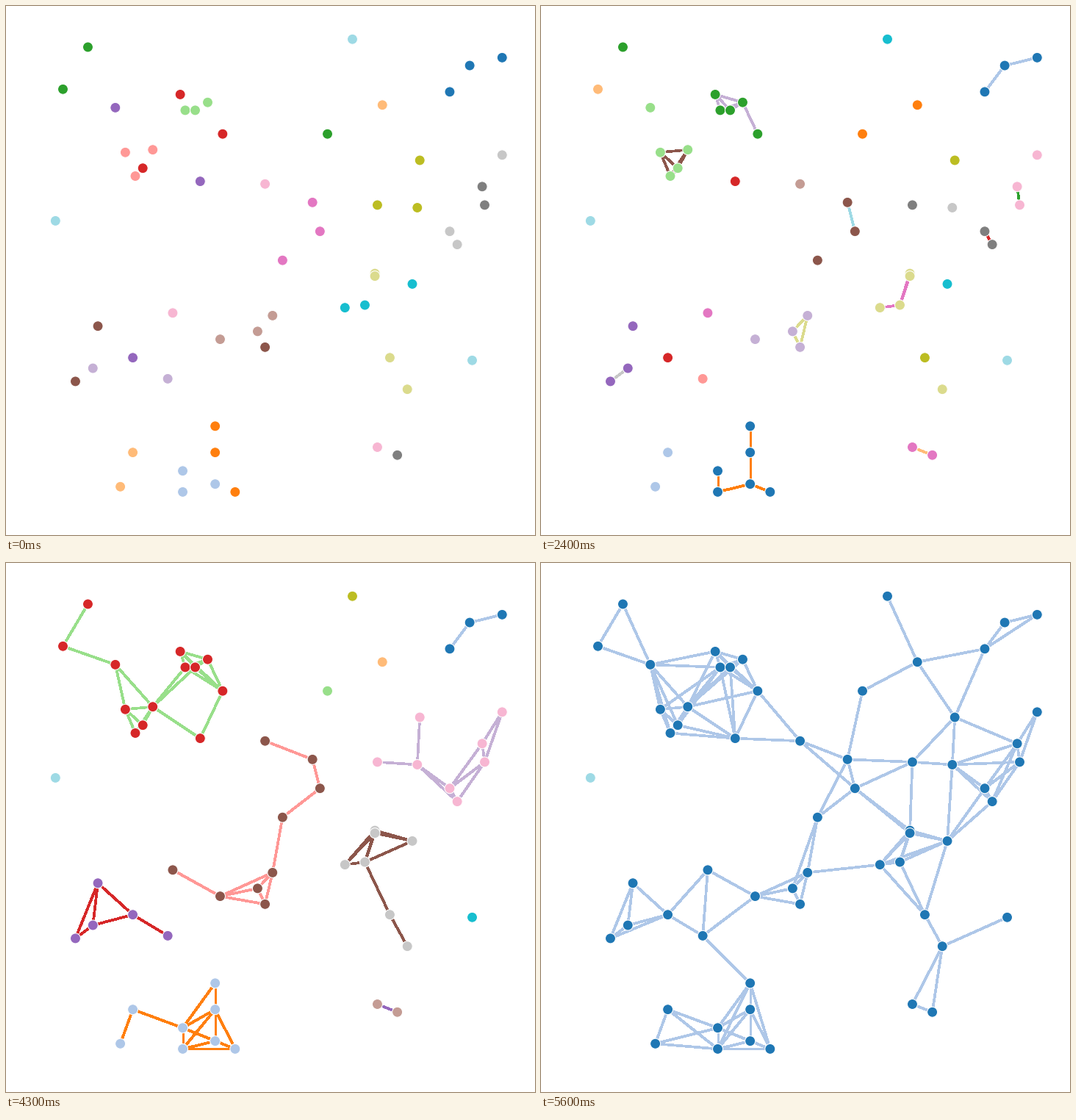
A matplotlib script for the animation above (5.7 s loop, 720x720 px).

```python
import numpy as np
import matplotlib.pyplot as plt
from matplotlib.animation import FuncAnimation
from matplotlib.collections import LineCollection

SIZE, DPI = 720, 96
FRAMES, INTERVAL = 57, 100
START, STEP = 1.5, 0.5
CMAP = plt.get_cmap("tab20")

# The scattered sites; links, groups and colours all follow from them
SITES = np.array([
    (158, 20), (166, 10), (179, 7), (51, 172), (51, 164), (64, 169),
    (64, 147), (64, 157), (72, 172), (31, 157), (26, 170), (131, 25),
    (109, 36), (3, 19), (13, 3), (52, 27), (56, 27), (61, 24),
    (50, 21), (67, 36), (35, 49), (28, 43), (39, 42), (32, 52),
    (24, 26), (58, 54), (31, 121), (45, 129), (15, 125), (8, 130),
    (17, 109), (84, 117), (87, 105), (81, 111), (66, 114), (103, 62),
    (106, 73), (91, 84), (84, 55), (47, 104), (129, 155), (137, 158),
    (171, 56), (172, 63), (179, 44), (158, 73), (161, 78), (129, 63),
    (145, 64), (146, 46), (134, 121), (141, 133), (128, 89), (128, 90),
    (116, 102), (124, 101), (143, 93), (119, 0), (167, 122), (0, 69),
])
xy = np.array([67.3, 45.2]) + SITES * np.array([3.3966, 3.5826])
dist2 = ((SITES[:, None] - SITES[None]) ** 2).sum(axis=2)


def components(near):
    """Label connected groups in order of their first site."""
    label = np.arange(len(near))
    while True:
        lowest = np.where(near, label, len(near)).min(axis=1)
        if (lowest == label).all():
            return np.unique(label, return_inverse=True)[1]
        label = lowest


fig = plt.figure(figsize=(SIZE / DPI, SIZE / DPI), dpi=DPI, facecolor="white")
ax = fig.add_axes([0, 0, 1, 1])
ax.set(xlim=(0, SIZE), ylim=(SIZE, 0))
ax.axis("off")

# Hard-edged links under smooth dots with a white rim
links = LineCollection([], linewidths=2, antialiaseds=False, zorder=1)
ax.add_collection(links, autolim=False)
dots = ax.scatter(*xy.T, s=110, c="white", edgecolors="white",
                  linewidths=0.8, zorder=2)


def update(frame):
    near = dist2 <= (START + STEP * frame) ** 2
    label = components(near)
    a, b = np.nonzero(np.triu(near, 1))
    links.set_segments(np.stack([xy[a], xy[b]], axis=1))
    links.set_color(CMAP((label[a] + 1) % CMAP.N))
    dots.set_facecolors(CMAP(label / label.max()))
    return links, dots


anim = FuncAnimation(fig, update, frames=FRAMES, interval=INTERVAL,
                     init_func=lambda: update(0), repeat=True, repeat_delay=0)
plt.show()
```
